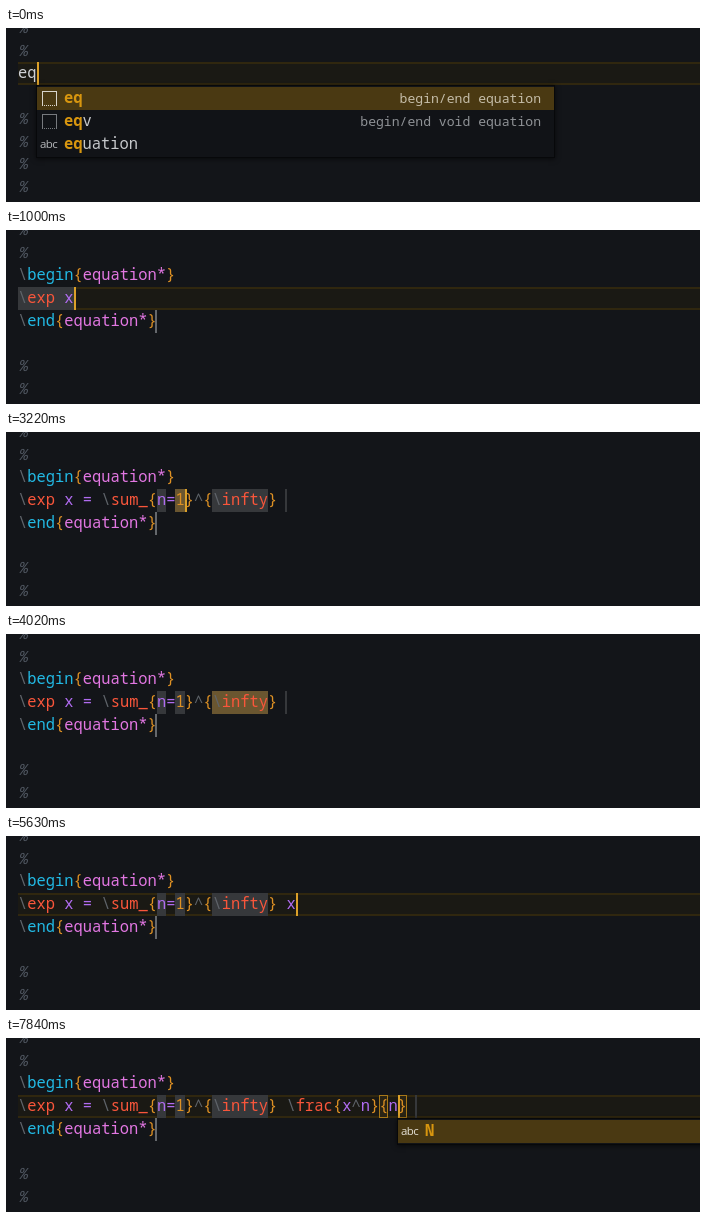
Write an HTML page that moves like this. It is 694 px wide and 174 px high and loops after 8000 ms.

```html
<!DOCTYPE html>
<html lang="en">
<head>
<meta charset="utf-8">
<title>Typing an equation</title>
<style>
html, body { margin: 0; width: 694px; height: 174px; overflow: hidden; background: #131519; }
#stage { position: relative; width: 694px; height: 174px; overflow: hidden;
  font: 500 15.433px/22.67px "Noto Sans Mono", "DejaVu Sans Mono", monospace; font-variant-ligatures: none; }
#stage div { position: absolute; box-sizing: border-box; white-space: pre; }
.dim { color: #5f646a; }
.note { color: #505761; font-style: italic; }
.env { color: #22b9e4; }
.name { color: #e277e2; }
.cmd { color: #f9563b; }
.brace, .num { color: #de9124; }
.var { color: #b06cf0; }
.plain { color: #cfd1d5; }
.active { background: #1a1914; border: solid #30270f; border-width: 2px 0; }
.hold, .stop { background: #36383b; }
.end { background: #65686c; }
.pick { background: #6a5630; }
.match { background: #d8960f18; border: 1px solid #d8960f48; }
.pair { background: #2a2414; border: 1px solid #a87818; }
.cursor { background: #dba02a; }
.popup { width: 519px; background: #111317; border: 1px solid #07080a; box-shadow: 0 1px 5px #0009; color: #c6c8cb; }
.row { left: 0; width: 517px; height: 23px; }
.row.on { background: #4a3912; }
.row b { color: #d8960f; }
.label { left: 27px; top: 0; }
.abc { left: 3px; top: 0; font: 11.5px/22px "Open Sans", sans-serif; letter-spacing: -.6px; color: #b5b7ba; }
.box { left: 5px; top: 4px; width: 15px; height: 15px; border: 1.5px solid #777a7e; border-bottom-style: dotted; }
.on .box { border-color: #d8d5cc; }
.on .abc { color: #e4e0d6; }
.detail { right: 13px; top: 0; font-size: 13.1px; color: #8f9296; }
.on .detail { color: #c5bda9; }
</style>
</head>
<body>
<div id="stage"></div>
<script>
const LEFT = 12, CHAR = 9.26, PITCH = 22.67, LOOP = 8000;
const stage = document.getElementById('stage');
const x = col => LEFT + col * CHAR;
const y = line => Math.ceil(34 + (line - 2) * PITCH);

const rules = /(?<note>%)|(?<dim>[\\^])|(?<env>begin|end)|(?<name>equation\*)|(?<cmd>exp|sum|infty|frac|_)|(?<brace>[{}])|(?<num>\d)|(?<var>[^\s])/g;
const paint = text => text.replace(rules, (token, ...rest) => {
  const groups = rest.at(-1);
  const kind = Object.keys(groups).find(k => groups[k]);
  return `<span class="${kind}">${token}</span>`;
});

const block = (kind, line, col, cols) =>
  `<div class="${kind}" style="left:${x(col)}px;top:${y(line)}px;width:${cols * CHAR}px;height:23px"></div>`;
const bar = (kind, line, left) =>
  `<div class="${kind}" style="left:${left}px;top:${y(line)}px;width:2px;height:23px"></div>`;
const cursor = (line, col) => bar('cursor', line, Math.round(x(col)));
const stop = (kind, line, col) => bar(kind, line, Math.floor(x(col)) - 1);
const write = (line, html) =>
  `<div style="left:${LEFT}px;top:${y(line)}px">${html}</div>`;

// Items: [matched part, remaining part, detail]; the first is selected.
function popup(line, col, items) {
  const rows = items.map(([hit, rest, detail], i) =>
    `<div class="row${i ? '' : ' on'}" style="top:${1 + i * 23}px">` +
    (detail ? `<div class="box"></div><div class="detail">${detail}</div>` : '<div class="abc">abc</div>') +
    `<div class="label"><b>${hit}</b>${rest}</div></div>`).join('');
  return `<div class="popup" style="left:${Math.round(x(col)) - 1}px;top:${y(line + 1)}px;height:${items.length * 23 + 4}px">${rows}</div>`;
}

const start = '\\exp x = ';
const sum = v => `${start}\\sum_{${v}=1}^{\\infty} `;
const sumN = sum('n');
const frac = v => `${sumN}\\frac{x^n}{${v}} `;
const words = [['eq', '', 'begin/end equation'], ['eq', 'v', 'begin/end void equation'], ['eq', 'uation']];
const iMatches = [[2, 4], [2, 12], [3, 22], [4, 10]];

// [start ms, text of the edited line, options]
const steps = [
  [0, 'eq', { raw: true, cursor: 2, list: words }],
  [190, '', { cursor: 0 }],
  [400, 'e', { cursor: 1 }],
  [600, 'ex', { cursor: 2 }],
  [800, '\\exp ', { cursor: 5 }],
  [1000, '\\exp x', { cursor: 6 }],
  [1210, '\\exp x ', { cursor: 7 }],
  [1410, '\\exp x =', { cursor: 8 }],
  [1610, start, { cursor: 9 }],
  [2220, sum('i'), { cursor: 16, pick: [15, 1], stop: 29 }],
  [2420, sum('i'), { cursor: 16, pick: [15, 1], stop: 29, matches: iMatches }],
  [2820, sumN, { cursor: 16, stop: 29 }],
  [3020, sumN, { cursor: 16, stop: 29, list: [['N', '']] }],
  [3220, sumN, { cursor: 18, pick: [17, 1], stop: 29 }],
  [3420, sumN, { cursor: 27, pick: [21, 6], stop: 29 }],
  [4020, sumN, { pick: [21, 6], stop: 29 }],
  [4630, sumN, { cursor: 29 }],
  [5020, sumN + 'x', { cursor: 30, list: [['x', 'i']] }],
  [5430, sumN + 'x', { cursor: 30 }],
  [6030, sumN + 'x^n', { cursor: 32 }],
  [6230, sumN + 'x^n/', { cursor: 33 }],
  [6640, frac(''), { cursor: 40, stop: 42, pairs: [39, 40] }],
  [7230, frac(''), { stop: 42, pairs: [39, 40] }],
  [7640, frac('n'), { cursor: 41, stop: 43, pairs: [39, 41] }],
  [7840, frac('n'), { cursor: 41, stop: 43, pairs: [39, 41], list: [['N', '']] }],
];

function render([, text, o]) {
  const line = o.raw ? 2 : 3;
  const lines = o.raw
    ? ['%', '%', text, '', '%', '%', '%', '%']
    : ['%', '%', '\\begin{equation*}', text, '\\end{equation*}', '', '%', '%'];
  let html = '';
  if (!o.pick) html += `<div class="active" style="left:${LEFT}px;right:0;top:${y(line)}px;height:23px"></div>`;
  if (text.includes('sum')) {
    for (const [col, cols] of [[15, 1], [17, 1], [21, 6]]) html += block('hold', line, col, cols);
  } else if (!o.raw) html += block('hold', line, 0, text.length);
  if (o.pick) html += block('pick', line, ...o.pick);
  for (const [row, col] of o.matches || []) html += block('match', row, col, 1);
  for (const col of o.pairs || []) html += block('pair', line, col, 1);
  if (o.stop) html += stop('stop', line, o.stop);
  if (!o.raw) html += stop('end', 4, 15);
  lines.forEach((s, i) => {
    html += write(i, o.raw && i === line ? `<span class="plain">${s}</span>` : paint(s));
  });
  if (o.cursor !== undefined) html += cursor(line, o.cursor);
  if (o.list) html += popup(line, o.cursor, o.list);
  stage.innerHTML = html;
}

let shown;
function tick() {
  const t = performance.now() % LOOP;
  const step = steps.findLast(s => s[0] <= t);
  if (step !== shown) render(shown = step);
  requestAnimationFrame(tick);
}
tick();
</script>
</body>
</html>
```
